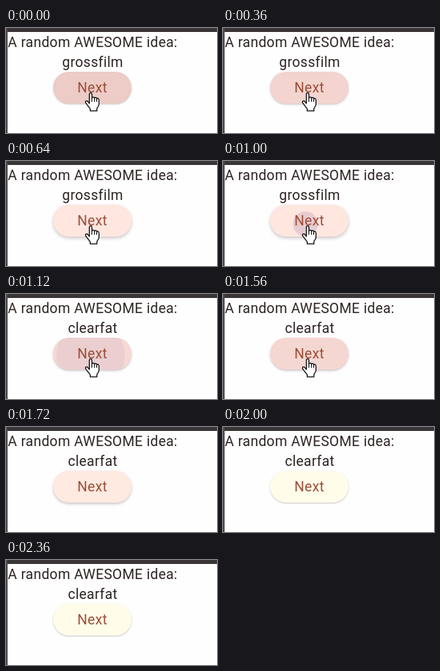
An HTML page for the animation above (2.4 s loop, 264 px wide and 132 px high).

```html
<!DOCTYPE html>
<html lang="en">
<head>
<meta charset="utf-8">
<style>
  html, body { margin: 0; width: 100%; height: 100%; overflow: hidden; background: #fffefe; }
  #stage { position: relative; width: 264px; height: 132px; overflow: hidden;
    font: 17.5px/25px Roboto, sans-serif; letter-spacing: .31px; color: #2b2322; }
  #stage > * { position: absolute; white-space: nowrap; }
  #top { left: 0; top: 0; width: 264px; height: 5px; background: #3a3536; }
  #side { left: 0; top: 0; width: 1.5px; height: 132px; background: #51494a; }
  .line { left: 2px; width: 213px; text-align: center; }
  #button { left: 59px; top: 55px; width: 98px; height: 40px; border-radius: 20px; overflow: hidden;
    line-height: 40px; text-align: center; color: #9c4e38; }
  #label { position: relative; }
  #ripple { position: absolute; border-radius: 50%; transform: translate(-50%, -50%); background: #e6cbd0; }
  #hand { left: 97.5px; top: 80px; }
</style>
</head>
<body>
<div id="stage">
  <div id="top"></div>
  <div id="side"></div>
  <div class="line" style="top:6px">A random AWESOME idea:</div>
  <div class="line" id="word" style="top:31px"></div>
  <div id="button"><div id="ripple"></div><span id="label">Next</span></div>
  <svg id="hand" width="20" height="26" viewBox="-1 -1 19 24.7">
    <path d="M5 2Q5 .5 6.5 .5T8 2V7Q8 5.6 9.5 5.6T11 7Q11 6 12.4 6T13.7 7.8Q14 7 15 7T16.4 9V14Q16.4 16 14 19V22H6V19.5L1 13Q-.3 11 1 10.3T3.3 11L5 13Z"
      fill="#fff" stroke="#111" stroke-width="1.2" stroke-linejoin="round"/>
    <path d="M8 7V11M11 7.5V11M13.7 8V11" stroke="#111" fill="none"/>
  </svg>
</div>
<script>
const LOOP = 2400, STEP = 40;
const PRESS = 940, FILLED = 1200, RELEASE = 1120, LEAVE = 1680;
const IDLE = [255, 253, 234], HOVER = [255, 230, 223], PRESSED = [237, 203, 198];
const $ = id => document.getElementById(id);

const ramp = (t, from, to) => Math.min(1, Math.max(0, (t - from) / (to - from)));
const mix = (a, b, p) => a.map((v, i) => v + (b[i] - v) * p);

function draw(t) {
  const hover = 1 - ramp(t, LEAVE, LEAVE + 220);
  const pressed = 1 - ramp(t, 280, 520) + ramp(t, 1040, FILLED) - ramp(t, 1440, 1700);
  const height = 1 + 2 * hover * (1 - pressed);
  const button = $('button').style;
  button.background = `rgb(${mix(mix(IDLE, HOVER, hover), PRESSED, pressed)})`;
  button.boxShadow = `0 ${.5 + height * .5}px ${1 + height}px rgba(70, 45, 60, .28)`;

  const grow = ramp(t, PRESS, FILLED), ripple = $('ripple').style;
  ripple.width = ripple.height = 24 + 130 * grow ** 2 + 'px';
  ripple.left = 42 + 7 * grow + 'px';
  ripple.top = 25 - 5 * grow + 'px';
  ripple.opacity = grow && 1 - grow ** 3;

  $('word').textContent = t < RELEASE ? 'grossfilm' : 'clearfat';
  $('hand').style.display = t < LEAVE ? '' : 'none';
}

const start = performance.now();
function tick() {
  const t = (performance.now() - start) % LOOP;
  draw(Math.floor(t / STEP) * STEP);
  requestAnimationFrame(tick);
}
tick();
</script>
</body>
</html>
```
